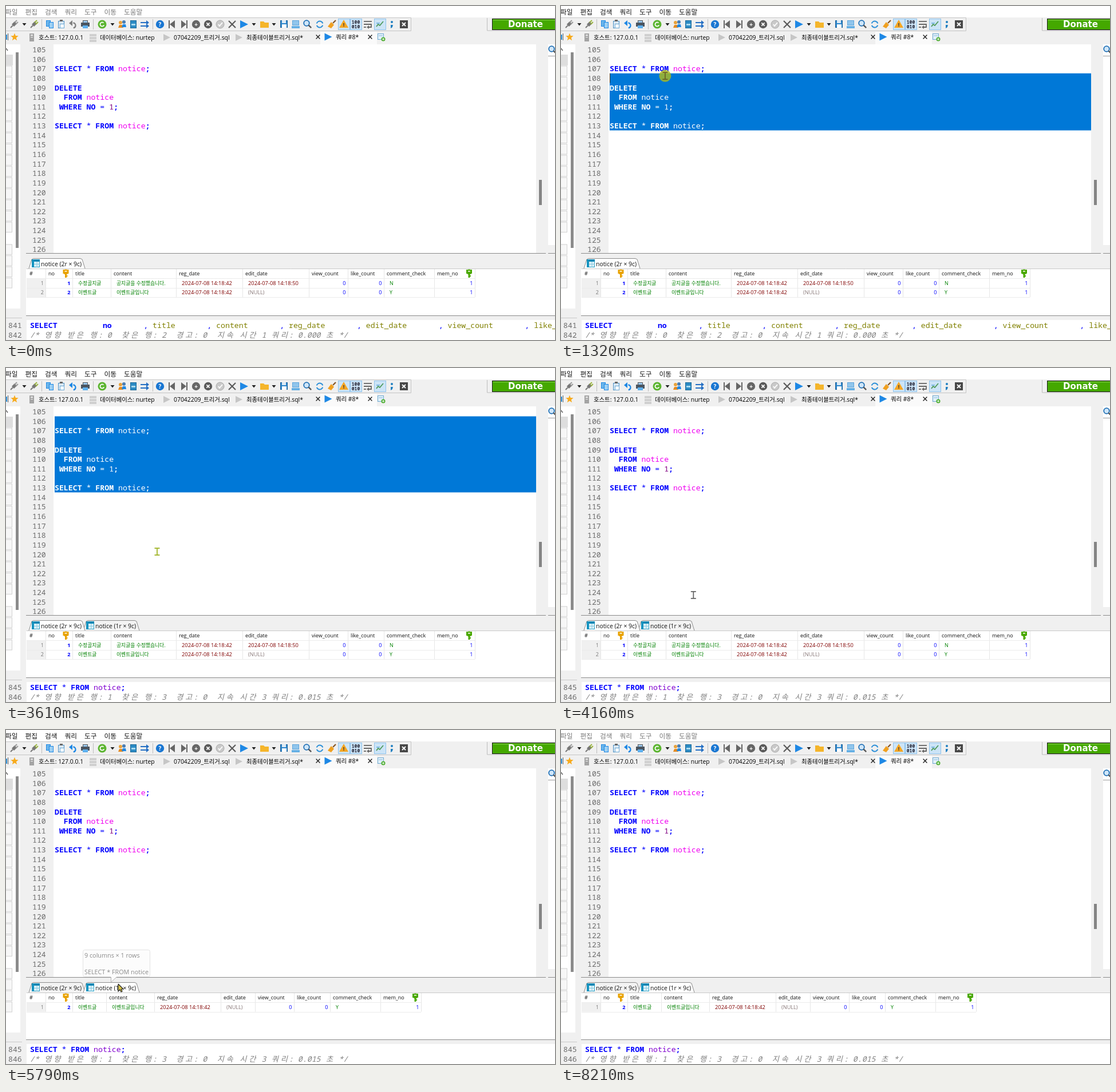
Recreate the animation shown at these times as an HTML page with a canvas. Size 959x584 px, loop 8.28 s.

```html
<!DOCTYPE html>
<html lang="ko">
<head>
<meta charset="utf-8">
<title>SQL editor</title>
<style>
html, body { margin: 0; width: 100%; height: 100%; overflow: hidden; background: #fff; }
canvas { display: block; }
</style>
</head>
<body>
<canvas id="stage" width="959" height="584"></canvas>
<script>
const g = document.getElementById('stage').getContext('2d');
const LOOP = 8280;
const UI = '"Open Sans", "Noto Sans CJK KR", "Noto Sans CJK", sans-serif';
const MONO = '"Noto Sans Mono", "Noto Sans CJK KR", "Noto Sans CJK", monospace';
const CELL = 7.93, ROW = 16.63, CODE_X = 85, FIRST = 105;
const PANEL = '#f0f0f0', BLUE = '#0000ff', SKY = '#1e88e5', DARK = '#5a5a5a';

// Moments of the hard changes, in ms
const ACTIVE = 830, PRESS = 900, RELEASE = 1450, QUERY = 2860, CLEAR = 3680,
      HINT_ON = 5050, TAB = 5590, HINT_OFF = 7150, LEAVE = 7960, INACTIVE = 8210;

const CODE = ['', '', 'SELECT * FROM notice;', '', 'DELETE', '  FROM notice',
  ' WHERE NO = 1;', '', 'SELECT * FROM notice;'];
const LOG_COLUMNS = 'SELECT          ' +
  ['no', 'title', 'content', 'reg_date', 'edit_date', 'view_count', 'like_count'].join('       , ');

const PATH = [[70, 955, 490], [830, 215, 226], [900, 205, 222], [1040, 186, 188],
  [1450, 180, 92], [1780, 180, 92], [1990, 310, 160], [3410, 310, 160], [3610, 264, 321],
  [3820, 256, 336], [4290, 222, 420], [4640, 205, 440], [5050, 203, 443], [5260, 196, 444],
  [6840, 196, 444], [7110, 300, 363], [7600, 750, 512], [7940, 805, 560], [8280, 805, 560]];

function mouseAt(t) {
  const i = Math.max(1, PATH.findIndex(p => p[0] > t));
  const [t0, x0, y0] = PATH[i - 1], [t1, x1, y1] = PATH[i];
  const k = Math.max(0, (t - t0) / (t1 - t0));
  return { x: x0 + (x1 - x0) * k, y: y0 + (y1 - y0) * k };
}

// Drawing helpers
function box(x, y, w, h, fill, border) {
  g.fillStyle = fill;
  g.fillRect(x, y, w, h);
  if (border) { g.strokeStyle = border; g.lineWidth = 1; g.strokeRect(x + .5, y + .5, w - 1, h - 1); }
}
function trace(points) {
  g.beginPath();
  for (let i = 0; i < points.length; i += 2) g.lineTo(points[i], points[i + 1]);
}
function poly(fill, ...points) { trace(points); g.fillStyle = fill; g.fill(); }
function line(color, width, ...points) {
  trace(points);
  g.strokeStyle = color; g.lineWidth = width; g.stroke();
}
function disc(x, y, r, fill) {
  g.beginPath(); g.arc(x, y, r, 0, 7); g.fillStyle = fill; g.fill();
}
function ring(x, y, r, color, width, from = 0, to = 7) {
  g.beginPath(); g.arc(x, y, r, from, to);
  g.strokeStyle = color; g.lineWidth = width; g.stroke();
}
function cross(x, y, r, color, width) {
  line(color, width, x - r, y - r, x + r, y + r);
  line(color, width, x + r, y - r, x - r, y + r);
}
function label(text, x, middle, size, color = '#000', style = '', align = 'left', font = UI) {
  g.font = `${style} ${size}px ${font}`;
  g.fillStyle = color; g.textAlign = align;
  g.fillText(text, x, middle + size * .36);
}
function mono(text, x, middle, color, style) {
  for (const ch of text) {
    const wide = /[가-힣]/.test(ch);
    if (ch !== ' ') label(ch, x + (wide ? 1.5 : 0), middle, 13.2, color, style, 'left', MONO);
    x += wide ? 2 * CELL : CELL;
  }
  return x;
}
function sql(text, x, middle, nameColor, override) {
  for (const word of text.match(/[A-Z]+|[a-z_]+|\d+|\s+|./g) || []) {
    const keyword = /^([A-Z]+|no)$/.test(word);
    const color = keyword ? BLUE : /^[a-z]/.test(word) ? nameColor : /\d/.test(word) ? '#800080' : BLUE;
    x = mono(word, x, middle, override || color, keyword || word === ';' ? 'bold' : '');
  }
}
const lineTop = n => 67.9 + (n - FIRST) * ROW;
const lineMiddle = n => 76.3 + (n - FIRST) * ROW;

// Toolbar icons
const Y = 32;
const dropdown = x => poly('#222', x - 3.5, Y - 2, x + 3.5, Y - 2, x, Y + 2.5);
const play = (x, y, r, fill) => poly(fill, x - r, y - r, x + r, y, x - r, y + r);
function badge(x, fill, glyph, color = '#fff') {
  disc(x, Y, 7.2, fill);
  label(glyph, x, Y, 10, color, 'bold', 'center');
}
function plug(x, accent) {
  line('#777', 2, x - 6, Y + 6, x - 2, Y + 2);
  poly('#777', x - 4, Y, x + 1, Y - 5, x + 5, Y - 1, x, Y + 4);
  line(accent, 2, x + 1, Y - 3, x + 5, Y - 7);
  line(accent, 2, x + 3, Y, x + 7, Y - 4);
}
function magnifier(x, y, r) {
  disc(x, y, r, '#cfe6f8'); ring(x, y, r, '#1f6fb5', 1.8);
  line('#555', 2.4, x + r * .7, y + r * .7, x + r * 1.7, y + r * 1.7);
}
function skip(x, dir) {
  poly('#666', x + 5 * dir, Y - 7, x - 4 * dir, Y, x + 5 * dir, Y + 7);
  box(x - 5 * dir - 1, Y - 7, 2, 14, '#666');
}

function toolbar(t) {
  box(0, 20, 959, 25, PANEL);
  line('#c4c4c4', 1, 0, 20.5, 707.5, 20.5, 707.5, 43.5, 0, 43.5);
  for (const x of [62, 152, 256]) line('#bdbdbd', 1, x + .5, 23, x + .5, 41);
  [32, 186, 433, 468].forEach(dropdown);
  plug(14, '#999'); plug(49, '#98b43c');

  box(70, 25, 8, 11, '#6bb5ea', SKY); box(75, 28, 8, 11, '#9ed0f3', SKY);
  box(91, 26, 11, 13, '#d9e8f4', '#4a90c4'); box(94, 24, 5, 3, '#666'); box(94, 31, 8, 8, '#fff', '#6aa9d6');
  const undo = t < ACTIVE ? '#808080' : SKY;
  poly(undo, 110, 30, 116, 25, 116, 35);
  ring(117, 34, 4.5, undo, 2.3, -1.5, 1.4);
  box(134, 25, 9, 5, '#9ccaf0', '#555'); box(131, 29, 15, 7, '#4b5560'); box(134, 34, 9, 5, '#5eb0ee');

  disc(168, Y, 7.5, '#5cb531'); ring(168, Y, 3.5, '#fff', 1.8, .4, 5.5);
  disc(200, 29, 3, '#e9a23b'); poly('#e58a1f', 196, 38, 198, 33, 203, 33, 205, 38);
  disc(206, 28, 3, '#4b7fb5'); poly(SKY, 202, 37, 204, 32, 209, 32, 210, 37);
  box(217, 25, 11, 14, '#2c8bc4', '#1d6a99'); box(219, 31, 7, 3, '#a7d9ef');
  line('#246fc4', 2, 235, 29, 246, 29); poly('#246fc4', 245, 25, 250, 29, 245, 33);
  line('#246fc4', 2, 235, 35, 246, 35); poly('#246fc4', 245, 31, 250, 35, 245, 39);

  badge(269, '#1976d2', '?'); skip(290, 1); skip(311, -1);
  badge(332, '#666', '+'); disc(353, Y, 7.2, DARK); cross(353, Y, 2.6, '#fff', 1.8);
  disc(374, Y, 7, '#c9c9c9'); ring(374, Y, 7, '#aaa', 1);
  line('#fff', 1.8, 371, 32, 373, 35, 378, 29); cross(395, Y, 6, DARK, 2.2);
  play(416, Y, 7, SKY);
  poly('#f5b52b', 444, 27, 450, 27, 452, 29, 459, 29, 459, 38, 444, 38);
  box(479, 25, 13, 13, '#2d86cb', '#1b5f97'); box(482, 25, 7, 5, '#dceaf5'); box(482, 32, 8, 6, '#fff');
  box(500, 25, 12, 9, '#90c5ec', '#5da5dc'); box(499, 35, 14, 4, '#64afe4');
  magnifier(525, 30, 4.8);
  ring(548, Y, 5.5, '#2b8fd8', 2, .3, 2.8); ring(548, Y, 5.5, '#2b8fd8', 2, 3.4, 6);
  line('#8a5a2b', 2.4, 576, 25, 571, 30); poly('#f0a020', 568, 28, 573, 33, 568, 39, 562, 36);

  for (const x of [580, 601, 643]) box(x, 22, 21, 20, '#cce4f7', '#8fc3ec');
  poly('#f5a623', 590, 24, 598, 38, 582, 38); label('!', 590, 33, 9, '#333', 'bold', 'center');
  label('100', 611, 28, 8, '#223', 'bold', 'center', MONO);
  label('010', 611, 36, 8, '#223', 'bold', 'center', MONO);
  line('#666', 1.8, 625, 27, 639, 27); line('#666', 1.8, 625, 32, 638, 32, 638, 37, 632, 37);
  line('#666', 1.8, 625, 37, 629, 37); poly('#666', 630, 37, 634, 34, 634, 40);
  line('#4f9a5b', 1.8, 647, 36, 650, 32, 653, 34, 659, 27); line('#60a7d8', 1.4, 647, 30, 653, 30);
  disc(674, 28, 2, '#1f7fc0'); poly('#1f7fc0', 672, 33, 676, 33, 675, 37, 672, 39);
  box(688, 25, 14, 14, '#484848'); cross(695, Y, 3, '#fff', 1.8);

  line('#bdbdbd', 1, 840.5, 21, 840.5, 43, 959, 43);
  box(849, 22, 112, 20, '#44a800', '#1b1b1b');
  line('#83d04b', 1, 851, 24.5, 959, 24.5);
  label('Donate', 877, 32, 15, '#fff', 'bold', 'left', '"DejaVu Sans", sans-serif');
}

function menu(t) {
  const color = t >= ACTIVE && t < INACTIVE ? '#111' : '#777';
  ['파일', '편집', '검색', '쿼리', '도구', '이동', '도움말'].forEach((name, i) =>
    label(name, -1 + i * 34.5, 11, 11.7, color));
}

function pageTabs() {
  box(0, 45, 959, 22, PANEL);
  box(549, 45, 99, 22, '#fafafa');
  box(0, 49, 4, 11, '#fff'); box(0, 50, 2, 9, '#2a8ad0'); box(3, 48, 1, 12, '#555');
  const star = [];
  for (let i = 0; i < 10; i++) {
    const r = i % 2 ? 3 : 7, a = i * Math.PI / 5 - Math.PI / 2;
    star.push(15 + r * Math.cos(a), 54.5 + r * Math.sin(a));
  }
  poly('#f7ab1e', ...star);
  box(41, 48, 8, 14, '#a4a4a4'); box(43, 50, 4, 2, '#eee'); box(43, 54, 4, 1, '#eee');
  for (const y of [49, 54, 59]) box(146, y, 12, 4, '#cfcfcf');
  play(281, 55, 6, '#c6c6c6'); play(407, 55, 6, '#c6c6c6'); play(563, 54, 6.5, SKY);
  label('호스트: 127.0.0.1', 57, 55, 10.4);
  label('데이터베이스: nurtep', 164, 55, 10.4);
  label('07042209_트리거.sql', 293, 55, 10.4);
  label('최종테이블트리거.sql*', 420, 55, 10.4);
  label('쿼리 #8*', 576, 54, 10.4);
  cross(545, 54, 3.4, '#222', 1.4); cross(636, 54, 3.4, '#222', 1.4);
  box(649, 48, 11, 11, '#e4f1fa', '#6da9d2'); line('#7fb5d8', 1, 651, 52, 658, 52);
  disc(659, 58, 3.5, '#4fae33');
  line('#fff', 1, 657, 58, 661, 58); line('#fff', 1, 659, 56, 659, 60);
}

function sidePanels() {
  box(0, 67, 35, 482, PANEL);
  box(0, 67, 25, 462, '#fff');
  line('#555', 1.3, 0, 74, 3, 78);
  box(0, 85, 12, 19, '#dedede');
  for (let i = 1; i < 21; i++)
    if (i !== 16) box(-1, 85 + i * 19.5, 12, 18.5, '#f7f7f7', '#d2d2d2');
  box(17, 81, 5, 342, '#8b8b8b');
  line('#c8c8c8', 1, 0, 545.5, 28, 545.5);

  box(943, 67, 16, 366, PANEL);
  box(947, 67, 12, 351, '#fff');
  magnifier(953, 75, 4.8);
  line('#999', 1, 947, 87.5, 959, 87.5);
}

function selectionAt(t) {
  if (t < PRESS || t >= CLEAR) return null;
  const { x, y } = mouseAt(Math.min(t, RELEASE));
  const head = Math.floor((y - lineTop(FIRST)) / ROW) + FIRST;
  if (head >= 114) return null;
  const column = Math.min(CODE[head - FIRST].length, Math.round((x - CODE_X) / CELL));
  return { head, x: CODE_X + column * CELL };
}

function codeText(override) {
  CODE.forEach((text, i) => sql(text, CODE_X, lineMiddle(FIRST + i), '#f000f0', override));
}

function editor(t) {
  box(35, 67, 48, 366, PANEL);
  box(83, 67, 843, 366, '#fff');
  box(926, 67, 17, 366, PANEL);
  box(931, 304, 5, 44, '#858585');
  for (let n = FIRST; n <= 126; n++) mono(String(n), 46, lineMiddle(n), '#6c6c6c');
  codeText();

  const sel = selectionAt(t);
  if (sel) {
    const next = lineTop(sel.head + 1);
    g.save();
    g.beginPath();
    g.rect(sel.x, lineTop(sel.head), 926 - sel.x, ROW);
    g.rect(CODE_X, next, 926 - CODE_X, lineTop(114) - next);
    g.clip();
    box(CODE_X, 67, 841, 366, '#0078d7');
    codeText('#fff');
    g.restore();
    if (t < RELEASE) box(sel.x, lineTop(sel.head), 1, ROW, '#4a3a20');
  }
  line('#8a8a8a', 1, 35, 432.5, 943, 432.5);
  line('#8a8a8a', 1, 947, 432.5, 959, 432.5);
}

function resultTab(x, title, active) {
  const shape = [x, 459, x + 5, 443, x + 8, 441.5, x + 90, 441.5, x + 93, 443, x + 98, 459];
  poly(active ? '#fff' : '#f3f3f3', ...shape);
  line('#8c8c8c', 1, ...shape);
  box(x + 5, 443, 14, 14, '#d9f0f8', '#2b9fc4');
  box(x + 5, 443, 14, 4, '#0d87b4'); box(x + 5, 443, 4, 14, '#1593bf');
  line('#8ecbe0', 1, x + 9, 451.5, x + 19, 451.5); line('#8ecbe0', 1, x + 14, 447, x + 14, 457);
  label(title, x + 21, 451, 10.4, '#111');
}

function key(x, color) {
  box(x - 5, 461, 10, 7, color); disc(x, 465, 4.5, color);
  box(x - 1.5, 468, 3, 7, color); box(x, 471, 3, 2, color);
  box(x - 2, 463, 4, 1.5, '#fff');
}

const FIELDS = ['no', 'title', 'content', 'reg_date', 'edit_date', 'view_count',
  'like_count', 'comment_check', 'mem_no'];
const STAMP = '2024-07-08 14:18:42';
const EVENT = ['2', '이벤트글', '이벤트글입니다', STAMP, '(NULL)', '0', '0', 'Y', '1'];
const RESULTS = [
  { edges: [69, 116, 183, 297, 413, 529, 597, 660, 748, 819],
    rows: [['1', '수정골지글', '공지글을 수정했습니다.', STAMP, '2024-07-08 14:18:50', '0', '0', 'N', '1'], EVENT] },
  { edges: [69, 116, 175, 259, 375, 435, 503, 566, 654, 725], rows: [EVENT] }
];

function cell(value, field, left, right, y) {
  const number = [0, 5, 6, 8].includes(field);
  if (number) label(value, right - 3.5, y, 9.2, BLUE, field ? '' : 'bold', 'right');
  else if (value === '(NULL)') label(value, left + 10, y, 9.2, '#8a7a7a');
  else if (field === 3 || field === 4) label(value, left + 10, y, 9.3, '#800000');
  else label(value, left + 10, y, 8.8, '#008000');
}

function results(t) {
  const second = t >= TAB;
  box(35, 433, 924, 27, PANEL);
  line('#c8c8c8', 1, 36, 459.5, 959, 459.5);
  if (t >= QUERY && !second) resultTab(135, 'notice (1r × 9c)', false);
  resultTab(40, 'notice (2r × 9c)', !second);
  if (second) resultTab(135, 'notice (1r × 9c)', true);

  box(35, 460, 924, 82, '#fff');
  const { edges, rows } = RESULTS[second ? 1 : 0];
  const bottom = 476 + rows.length * 16.6, end = edges[9];
  box(36, 476, 33, bottom - 476, PANEL);
  for (const x of edges) line('#e6e6e6', 1, x + .5, 460, x + .5, bottom);
  for (let y = 476; y <= bottom + 1; y += 16.6)
    line('#ebebeb', 1, 36, Math.round(y) + .5, end, Math.round(y) + .5);
  label('#', 41, 467.5, 9, '#111');
  FIELDS.forEach((name, i) => label(name, edges[i] + 5, 467.5, 9, '#111'));
  key(104.5, '#e8a200'); key(end - 10, '#4aa800');
  rows.forEach((row, r) => {
    const y = 484.5 + r * 16.6;
    label(String(r + 1), 66, y, 9, '#777', '', 'right');
    row.forEach((value, i) => cell(value, i, edges[i], edges[i + 1], y));
  });
  box(35, 541, 924, 1, '#8a8a8a');
  box(35, 542, 924, 7, PANEL);
}

function log(t) {
  const done = t >= QUERY;
  box(0, 549, 36, 35, PANEL);
  box(36, 549, 923, 35, '#fff');
  mono(done ? '845' : '841', 4, 558.5, '#6c6c6c');
  mono(done ? '846' : '842', 4, 575, '#6c6c6c');
  if (done) sql('SELECT * FROM notice;', 42, 558.5, '#8000d0');
  else sql(LOG_COLUMNS, 42, 558.5, '#808000');
  const [changed, found, queries, time] = done ? [1, 3, 3, '0.015'] : [0, 2, 1, '0.000'];
  mono(`/* 영향 받은 행: ${changed}  찾은 행: ${found}  경고: 0  지속 시간 ${queries} 쿼리: ${time} 초 */`,
    42, 575, '#808080', 'italic');
}

function hint(t) {
  if (t < HINT_ON || t >= HINT_OFF) return;
  g.beginPath(); g.roundRect(134.5, 384.5, 117, 47, 3);
  g.fillStyle = '#fcfcfc'; g.fill();
  g.strokeStyle = '#e2e2e2'; g.lineWidth = 1; g.stroke();
  poly('#fcfcfc', 183, 431, 194, 431, 184, 441);
  line('#b5b5b5', 1, 183.5, 432, 183.5, 441, 193, 432);
  label('9 columns × 1 rows', 137, 394.5, 10.8, '#8a8a8a');
  label('SELECT * FROM notice', 137, 423.5, 10.8, '#8a8a8a');
}

function mouse(t) {
  if (t < 70 || t >= LEAVE) return;
  const { x, y } = mouseAt(t);
  const pressed = (t >= PRESS && t < RELEASE) || (t >= CLEAR && t < CLEAR + 140) || (t >= TAB && t < TAB + 200);
  if (pressed) disc(x, y, 10.5, 'rgba(172, 184, 28, .82)');
  if (y > 432 || x > 926) {
    const arrow = [x, y, x, y + 13, x + 3, y + 10, x + 5, y + 14, x + 7, y + 13, x + 5.5, y + 9, x + 9, y + 9, x, y];
    poly('#d9c548', ...arrow);
    line('#222', 1.2, ...arrow);
    return;
  }
  const color = pressed ? '#6b6324' : t < CLEAR && t >= 3410 ? '#a0b428' : t >= RELEASE && t < CLEAR ? '#704c32' : '#666';
  const w = t >= RELEASE && t < 3410 ? 3 : 4.5;
  line(color, 1.8, x - w, y - 6, x + w, y - 6);
  line(color, 1.8, x, y - 6, x, y + 6);
  line(color, 1.8, x - w, y + 6, x + w, y + 6);
}

function frame() {
  const t = performance.now() % LOOP;
  box(0, 0, 959, 584, '#fff');
  menu(t);
  toolbar(t);
  pageTabs();
  sidePanels();
  editor(t);
  results(t);
  log(t);
  hint(t);
  mouse(t);
  requestAnimationFrame(frame);
}
frame();
</script>
</body>
</html>
```
